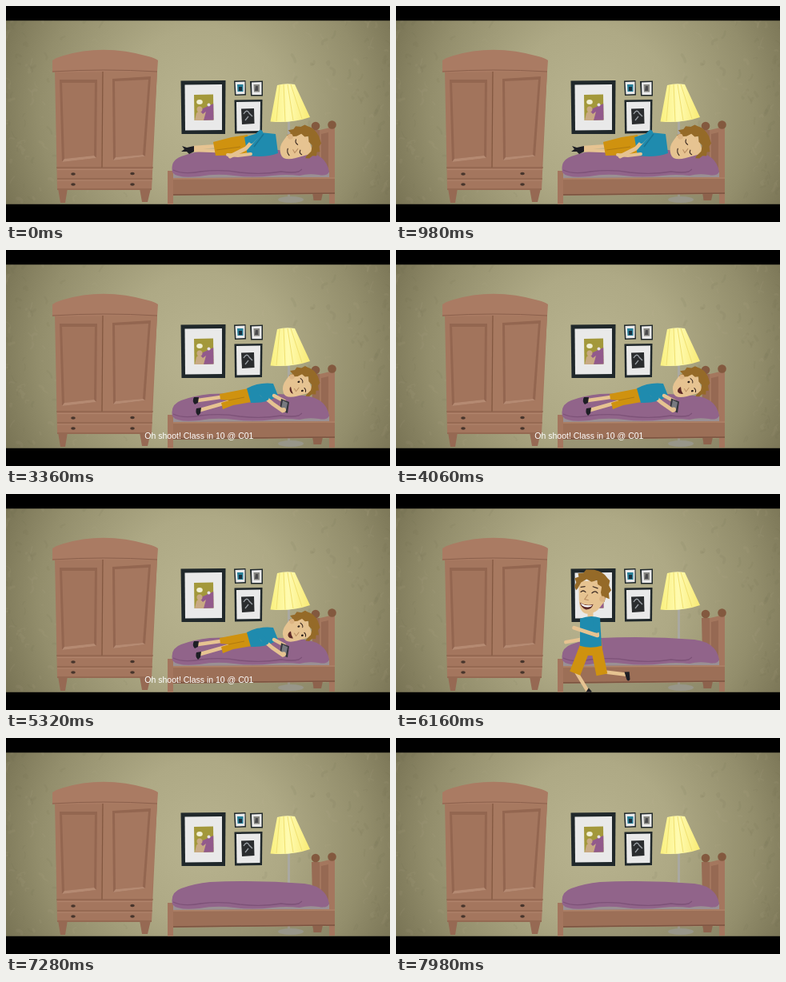
Animation, 480 px wide and 270 px high, one loop 8120 ms. Source, as an HTML page:

```html
<!DOCTYPE html>
<html lang="en">
<head>
<meta charset="utf-8">
<title>Late for class</title>
<style>
  html, body { margin: 0; width: 100%; height: 100%; overflow: hidden; background: #000; }
  svg { display: block; width: 480px; height: 270px; }
  text { font: 10.5px "Liberation Sans", Arial, sans-serif; fill: #fff; }
  .limb { fill: none; stroke: #e6c391; stroke-linecap: round; stroke-linejoin: round; }
</style>
</head>
<body>
<svg viewBox="0 0 480 270">
  <defs>
    <radialGradient id="wall" gradientUnits="userSpaceOnUse" cx="245" cy="130" r="290">
      <stop offset="0" stop-color="#b8b38f"/>
      <stop offset=".35" stop-color="#aea985"/>
      <stop offset=".7" stop-color="#938e6c"/>
      <stop offset="1" stop-color="#716c4e"/>
    </radialGradient>
    <linearGradient id="shade" x2="1">
      <stop offset="0" stop-color="#faf07e"/>
      <stop offset=".45" stop-color="#fffbb0"/>
      <stop offset="1" stop-color="#f8ea74"/>
    </linearGradient>
    <clipPath id="room"><rect y="18.3" width="480" height="229.5"/></clipPath>
  </defs>
  <g clip-path="url(#room)">
    <rect width="480" height="270" fill="url(#wall)"/>
    <g id="mottle" fill="none" stroke-linecap="round"></g>

    <!-- wardrobe -->
    <path d="M65 228H77L74 246H68ZM167 228H181L177 245H170Z" fill="#966953"/>
    <path d="M61 80H189L182 230H64Z" fill="#a4765e"/>
    <path d="M121 82H189L182 202H120Z" fill="#a77960"/>
    <path d="M58 83V68Q64 64 72 62Q122 47 178 63Q186 65 190 68L189 82Z" fill="#aa7b63"/>
    <path d="M58 82Q122 78 189 82" fill="none" stroke="#8b604c"/>
    <path d="M121 82L120 202" stroke="#80563f" stroke-width="1.2"/>
    <path d="M67 92H114L113 190L70 195Z" fill="#936650"/>
    <path d="M70 96H111L110 187L73 191Z" fill="#a2745c"/>
    <path d="M70 195L73 191L110 187L113 190Z" fill="#b58a72"/>
    <path d="M133 91L181 88L174 188L134 193Z" fill="#936650"/>
    <path d="M136 94L178 92L171 186L137 189Z" fill="#a5775f"/>
    <path d="M134 193L137 189L171 186L174 188Z" fill="#b58a72"/>
    <path d="M63 202H184M64 216H183M64 229H182" fill="none" stroke="#875c47" stroke-width="1.2"/>
    <path d="M64 204.5H183M64 218H183" fill="none" stroke="#b0846c"/>
    <g fill="#47352c">
      <ellipse cx="84" cy="210" rx="2.8" ry="1.8"/><ellipse cx="158" cy="209.5" rx="2.8" ry="1.8"/>
      <ellipse cx="84" cy="223" rx="2.8" ry="1.8"/><ellipse cx="158" cy="223" rx="2.8" ry="1.8"/>
    </g>

    <!-- pictures -->
    <g fill="#20282b">
      <path d="M218.5 93.5L274.5 93L274 160L219.500 160Z"/>
      <path d="M285 93.500L299.500 93L300 111.500L286 112Z"/>
      <path d="M305 94L321 93.500L321 112.500L306 112.500Z"/>
      <path d="M285.500 117.500L320.500 117L320 159L286 159.500Z"/>
    </g>
    <g fill="#e9e9e9">
      <path d="M223.500 98.500L270 98L270 155L224 155.500Z"/>
      <path d="M286.500 95L298.500 94.500L298.500 110L287.500 110.500Z"/>
      <path d="M307 95.500L319.500 95L319.500 111L307.500 111Z"/>
      <path d="M288 120L318 119.500L317.500 156L288.500 156.500Z"/>
    </g>
    <path d="M235 111L259 110.500L259.500 142.500L235.500 143Z" fill="#a3983b"/>
    <path d="M242 130L259.200 122L259.500 142.500L240 143Z" fill="#925a8c"/>
    <path d="M236 143L238 134Q242 129 246 135L250 132L247 143Z" fill="#c8a983"/>
    <circle cx="242" cy="129" r="3.500" fill="#c8a983"/>
    <ellipse cx="242" cy="120" rx="3.800" ry="3" fill="#f0eed2"/>
    <circle cx="253.500" cy="123.500" r="2" fill="#e6dfe2"/>
    <path d="M289 98H296.500V107H289.500Z" fill="#287f98"/>
    <path d="M291 101H295V106H291Z" fill="#1c303f"/>
    <path d="M309.500 98H317V107.500H310Z" fill="#858580"/>
    <path d="M312 100H315V106H311Z" fill="#4a4a4c"/>
    <path d="M294 128.500L310 128L310.500 147L295 148Z" fill="#2a2c2e"/>
    <path d="M297 135Q301 128 304 134L308 138M299 143L303 138" fill="none" stroke="#999ea4" stroke-width="1.300"/>

    <!-- lamp -->
    <path d="M353.500 138V240" stroke="#aaa9a2" stroke-width="3"/>
    <ellipse cx="356" cy="242" rx="16" ry="4" fill="#a8a8a5"/>
    <path d="M339 99Q349 96 361 98L380 139Q357 147 330.500 144.500Z" fill="url(#shade)"/>
    <path d="M342 99L338 144M347 98L349 144.500M352 98L359 143M356 98L370 141" fill="none" stroke="#f0e070" stroke-width="1"/>

    <!-- bed -->
    <path d="M388 156L405 152V212H388Z" fill="#a4775e"/>
    <path d="M394 160L403 158V205H394Z" fill="#966953"/>
    <path d="M382 155H392V243H384Z" fill="#986b54"/>
    <path d="M403 153H411V247H404Z" fill="#a4765e"/>
    <circle cx="387" cy="150" r="5.300" fill="#83593f"/>
    <circle cx="407.500" cy="148.500" r="5.300" fill="#83593f"/>
    <path d="M208 236H404V248H208Z" fill="#817b60" opacity=".4"/>
    <path d="M383 234H396L394 243H385Z" fill="#8d624c"/>
    <path d="M207 208H404V217H207Z" fill="#9a9094"/>
    <path d="M202 215L411 214V235L202 237Z" fill="#9c6f57"/>
    <path d="M202 216L411 215" stroke="#b08469" stroke-width="1.500"/>
    <path d="M202 236L411 234" stroke="#7c5441" stroke-width="1.500"/>
    <path d="M202 206H209V248H202Z" fill="#a4765e"/>
    <path d="M208 208Q205 193 219 188Q235 182 255 180Q315 177 373 182Q400 185 404 207Q402 213 391 211Q378 209 367 212Q350 210 333 212Q308 215 285 212Q262 209 242 213Q214 216 208 208Z" fill="#91648a"/>
    <path d="M209 205Q221 211 243 207Q269 204 292 208Q320 211 344 207Q358 209 366 207L370 204" fill="none" stroke="#7d5278" stroke-width="1.300"/>

    <g id="asleep">
      <path class="limb" d="M264 175L235 177M264 181L234 180" stroke-width="4.500"/>
      <path d="M235 175L226 177L220 175L223 179L219 182L226 182L229 185L235 182Z" fill="#1d1e24"/>
      <path d="M259 170L282 164L302 161L306 186L262 187Z" fill="#cf920f"/>
      <path d="M263 180L293 176" stroke="#b07a10"/>
      <g id="chest">
        <path d="M298 164L318 158L337 160L340 184Q325 190 302 187Z" fill="#1f8bae"/>
        <path class="limb" d="M306 185L290 187L277 186" stroke-width="4"/>
        <path d="M322 160L310 176" stroke="#1a7594" stroke-width="1.500"/>
        <path class="limb" d="M317 159L300 178L280 188" stroke-width="4.800"/>
        <path d="M318 158L307 169" stroke="#1f8bae" stroke-width="6" stroke-linecap="round"/>
      </g>
      <g id="sleepHead"></g>
    </g>

    <g id="awake">
      <path class="limb" d="M275 183L240 188M278 190L243 200" stroke-width="4.500"/>
      <path d="M241 184L235 184Q232 189 236 193L240 191ZM244 197L238 198Q236 203 240 207L243 204Z" fill="#1d1e24"/>
      <path d="M267 180L303 173L307 190L284 194L271 199L269 191L279 188L268 187Z" fill="#cf920f"/>
      <path d="M278 188L298 184" stroke="#b07a10"/>
      <path d="M301 173Q316 165 334 167L340 182Q327 192 306 191Z" fill="#1f8bae"/>
      <path class="limb" d="M335 182L348 189" stroke-width="4.500"/>
      <g id="phoneArm">
        <path d="M344 186L354 190L352 204L342 200Z" fill="#34363d"/>
        <path d="M346 188L352 191L350 201L344 198Z" fill="#777a80"/>
        <path class="limb" d="M320 181L333 192L346 201" stroke-width="4.800"/>
        <circle cx="347" cy="200" r="3" fill="#e6c391"/>
      </g>
      <path d="M317 176L325 185" stroke="#1f8bae" stroke-width="7" stroke-linecap="round"/>
      <g id="wakeHead"></g>
    </g>

    <g id="runner">
      <path id="farArm" class="limb" stroke-width="4.500"/>
      <g id="backLeg"></g>
      <g id="frontLeg"></g>
      <path d="M62 185L89 184L90 199Q76 209 62 200Z" fill="#cf920f"/>
      <path class="limb" d="M75 148V160" stroke-width="7"/>
      <path d="M62 158Q75 153 87 157L89 192Q75 196 62 192Z" fill="#1f8bae"/>
      <path id="nearArm" class="limb" stroke-width="4.800"/>
      <path id="sleeve" stroke="#1f8bae" stroke-width="8" stroke-linecap="round"/>
      <g id="runHead"></g>
    </g>
  </g>
  <text id="caption" x="173.3" y="236">Oh shoot! Class in 10 @ C01</text>
</svg>
<script>
const LOOP = 8120, STEP = 140;
const WAKE = 2520, SPEAK = 2800, RUN = 5740, GONE = 7280;
const $ = id => document.getElementById(id);
const set = (id, name, value) => $(id).setAttribute(name, value);
const show = (id, on) => set(id, 'visibility', on ? 'visible' : 'hidden');

// Head faces left, centred on 0,0.
function head(id, eyes, mouth) {
  const lid = 'fill="none" stroke="#3b2a22" stroke-width="1.2" stroke-linecap="round"';
  const look = {
    shut: `<path d="M-12 1Q-9 4-6 1M2 2Q6 5 9 2" ${lid}/>`,
    open: `<g fill="#2b211d"><ellipse cx="-9" cy="0" rx="1.4" ry="1.8"/><ellipse cx="5" cy="1" rx="1.4" ry="1.8"/></g>
      <path d="M-12-4Q-9-6-6-4M2-4Q5-6 9-3" ${lid}/>`,
    glad: `<path d="M-12 0Q-9-3-6 0M2 1Q6-3 9 1M-12-6L-7-7M3-7L9-5" ${lid}/>`
  };
  const lips = {
    rest: `<path d="M-8 17Q-3 19 1 16" ${lid}/>`,
    talk: '<g class="mouth"><path d="M-9 14Q-4 16 2 14Q1 21-4 21Q-8 20-9 14Z" fill="#5c2a27"/></g>',
    grin: '<path d="M-13 13Q-5 18 4 15Q2 22-5 22Q-11 20-13 13Z" fill="#5c2a27"/><path d="M-12 14Q-5 18 3 16L1 18Q-5 20-10 17Z" fill="#fff"/>'
  };
  $(id).innerHTML = `
    <path d="M-15-14L-14 10Q-13 27-3 27Q7 27 13 18L18 11L17-14Z" fill="#e6c391"/>
    <path d="M-16-4L-18-2L-20-7L-18-12L-20-17L-15-19L-16-23L-9-24L-6-28L4-28Q16-26 21-18L24-15L23-9L26-3L23 1L24 8L19 6L18 12L15 8L13 0L14-7L9-10L8-15L1-13L-5-16L-12-12Z" fill="#956a28"/>
    <circle cx="15" cy="8" r="3.6" fill="#dcb483"/>
    <path d="M-3 3L-7 9L-2 10" fill="none" stroke="#b98e62" stroke-width="1.1"/>
    ${look[eyes]}${lips[mouth]}`;
}
head('sleepHead', 'shut', 'rest');
head('wakeHead', 'open', 'talk');
head('runHead', 'glad', 'grin');

// Faint plaster strokes, denser toward the sides.
let seed = 7;
const rnd = () => (seed = seed * 16807 % 2147483647) / 2147483647;
let strokes = '';
for (let i = 0; i < 170; i++) {
  const side = rnd() < .5, d = rnd() * rnd() * 190;
  const x = side ? d : 480 - d, y = 18 + rnd() * 230;
  strokes += `<path d="M${x} ${y}q${rnd() * 8 - 4} ${-rnd() * 6} ${rnd() * 12 - 6} ${-rnd() * 10}"
    stroke="${rnd() < .5 ? '#c0b996' : '#585438'}" stroke-width="${1 + rnd() * 3}" opacity=".07"/>`;
}
$('mottle').innerHTML = strokes;

const end = (x, y, deg, len) =>
  [x + len * Math.sin(deg * Math.PI / 180), y + len * Math.cos(deg * Math.PI / 180)];

function leg(id, hipX, phase) {
  const s = Math.sin(phase), c = Math.cos(phase);
  const [kx, ky] = end(hipX, 194, -5 + 21 * s, 35);
  const lower = 57 - 45 * c;
  const [fx, fy] = end(kx, ky - 4, lower, 31);
  $(id).innerHTML = `
    <path class="limb" d="M${kx} ${ky - 4}L${fx} ${fy}" stroke-width="4.5"/>
    <path d="M3-3L-6 1Q-9 4-5 5L4 3Z" fill="#1d1e24" transform="translate(${fx} ${fy}) rotate(${-lower})"/>
    <path d="M${hipX} 192L${kx} ${ky}" stroke="#cf920f" stroke-width="14"/>`;
}

function run(t) {
  const phase = -Math.PI / 2 + (t - 6720) / 620 * Math.PI * 2;
  const s = Math.sin(phase), bob = -4 * Math.abs(Math.cos(phase));
  set('runner', 'transform', `translate(${(6720 - t) * .3} ${bob})`);
  leg('frontLeg', 69, phase);
  leg('backLeg', 82, phase + Math.PI);
  const swing = (1 + s) / 2;
  set('farArm', 'd', `M66 163L${63 + 8 * swing} 184L${43 + 14 * swing} ${189 - 18 * swing}`);
  const ex = 83 + 9 * swing, ey = 179 + 2 * swing;
  set('nearArm', 'd', `M82 163L${ex} ${ey}L${53 + 18 * swing} ${168 + 17 * swing}`);
  set('sleeve', 'd', `M82 163L${82 + (ex - 82) * .55} ${163 + (ey - 163) * .55}`);
  set('runHead', 'transform', `translate(75 125) rotate(${2 * Math.cos(phase * 2) + 2})`);
}

function draw(t) {
  const asleep = t < WAKE, awake = t >= WAKE && t < RUN, running = t >= RUN && t < GONE;
  show('asleep', asleep);
  show('awake', awake);
  show('runner', running);
  show('caption', t >= SPEAK && t < RUN);
  if (asleep) {
    const b = Math.sin(t / 1960 * Math.PI * 2);
    set('chest', 'transform', `translate(0 ${-.4 * b})`);
    set('sleepHead', 'transform', `translate(367 ${174.5 - .3 * b}) rotate(72) scale(-.95 .95)`);
  }
  if (awake) {
    const open = .65 + .35 * Math.sin((t - 3360) / 560 * Math.PI * 2 - .6);
    set('wakeHead', 'transform', `translate(368 ${169 + .4 * Math.sin(t / 700)}) rotate(72) scale(-.86 .86)`);
    document.querySelector('.mouth').setAttribute('transform', `translate(0 ${14 * (1 - open)}) scale(1 ${open})`);
    set('phoneArm', 'transform', `translate(0 ${.5 * Math.sin(t / 350)})`);
  }
  if (running) run(t);
}

const start = performance.now();
function tick() {
  const t = (performance.now() - start) % LOOP;
  draw(Math.floor(t / STEP) * STEP);
  requestAnimationFrame(tick);
}
tick();
</script>
</body>
</html>
```
